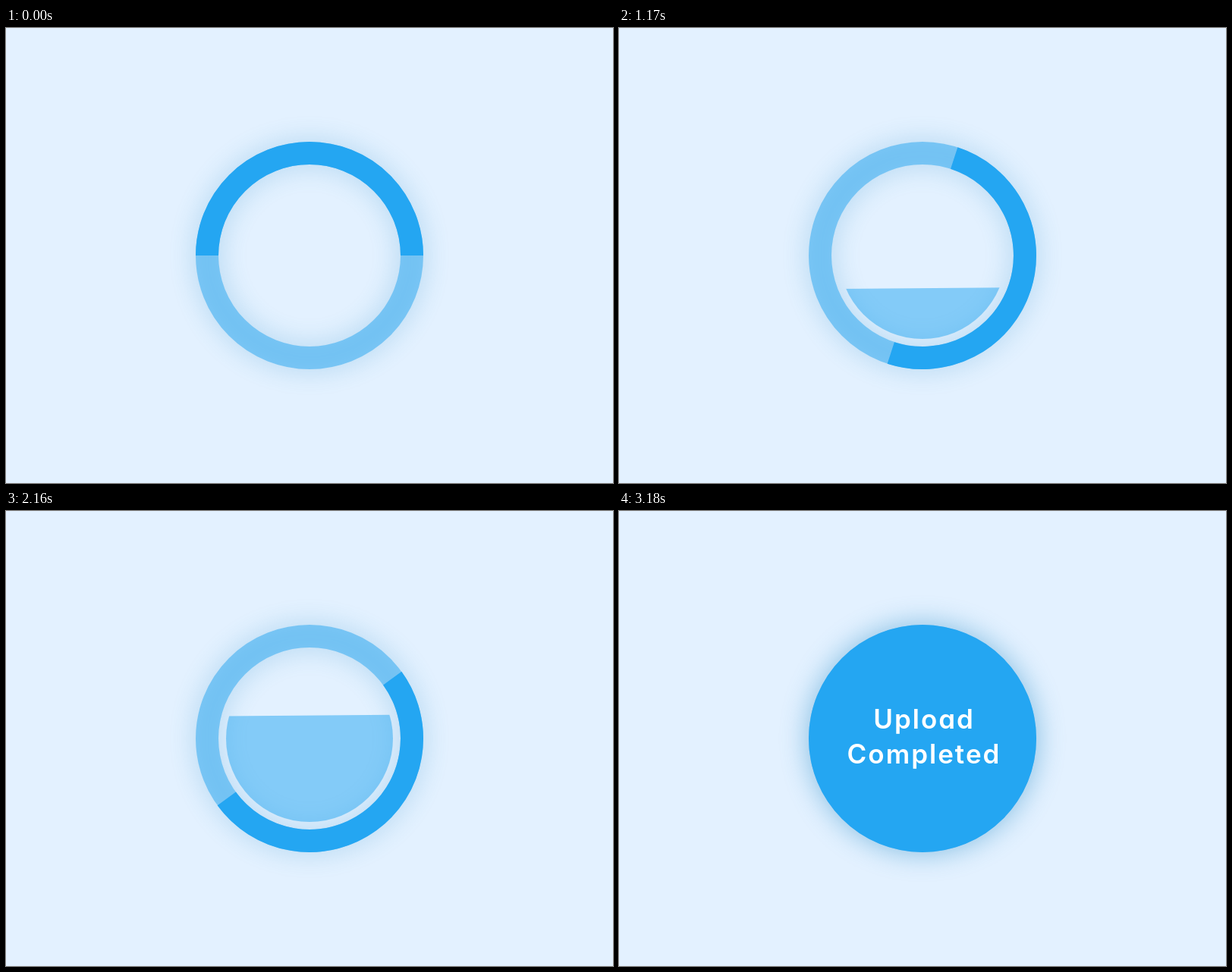
Animation, 800 px wide and 600 px high, one loop 4530 ms. Source, as an HTML page:

```html
<!DOCTYPE html>
<html lang="en">
<head>
<meta charset="utf-8">
<title>Upload progress</title>
<style>
  html, body { margin: 0; width: 100%; height: 100%; overflow: hidden; background: #e3f1ff; }
  svg { display: block; width: 800px; height: 600px; }
  .ring { fill: none; stroke: #24a6f2; stroke-width: 30; }
  .half { opacity: .5; }
  .solid { fill: #24a6f2; }
  #shadow { stroke: #1480c0; filter: blur(18px); }
  text {
    font: 600 35px Inter, Lato, sans-serif;
    font-feature-settings: "cv11";
    letter-spacing: 2px;
    text-anchor: middle;
    fill: #fff;
  }
</style>
</head>
<body>
<svg viewBox="0 0 800 600">
  <clipPath id="bowl"><circle cx="400" cy="300" r="110"/></clipPath>
  <circle id="shadow" class="ring" cx="400" cy="300" r="135"/>
  <circle class="ring half" cx="400" cy="300" r="135"/>
  <path id="arc" class="ring" d="M265 300a135 135 0 0 1 270 0"/>
  <g clip-path="url(#bowl)">
    <rect id="liquid" class="solid half" x="200" width="400" height="320"/>
  </g>
  <g id="done">
    <circle id="disc" class="solid" cx="400" cy="300" r="120"/>
    <text x="402" y="287">Upload</text>
    <text x="402" y="333">Completed</text>
  </g>
</svg>
<script>
const STEP = 30, LOOP = 4530;
const SPIN_END = 90, FADE_START = 91, FADE_STEPS = 8, FINISH = 106;

const $ = id => document.getElementById(id);
const shadow = $('shadow'), arc = $('arc'), liquid = $('liquid'), done = $('done'), disc = $('disc');
const start = performance.now();

// Height of the liquid for progress u, slowly speeding up
const fill = u => u * (164 - 65 * u + 99 * u * u);

function draw() {
  const n = Math.floor((performance.now() - start) % LOOP / STEP);
  const spinning = n < SPIN_END, finished = n >= FINISH;

  arc.setAttribute('visibility', spinning ? 'visible' : 'hidden');
  arc.setAttribute('transform', `rotate(${n * 12} 400 300)`);

  const level = spinning ? 410 - fill(n / SPIN_END) : 150;
  liquid.setAttribute('visibility', n ? 'visible' : 'hidden');
  liquid.setAttribute('transform', `translate(0 ${level}) rotate(-.44 400 0)`);

  done.style.opacity = Math.min(1, Math.max(0, (n - FADE_START) / FADE_STEPS));
  disc.setAttribute('r', finished ? 150 : 120);
  shadow.style.opacity = spinning ? .245 : finished ? .5 : .3;

  requestAnimationFrame(draw);
}
draw();
</script>
</body>
</html>
```
